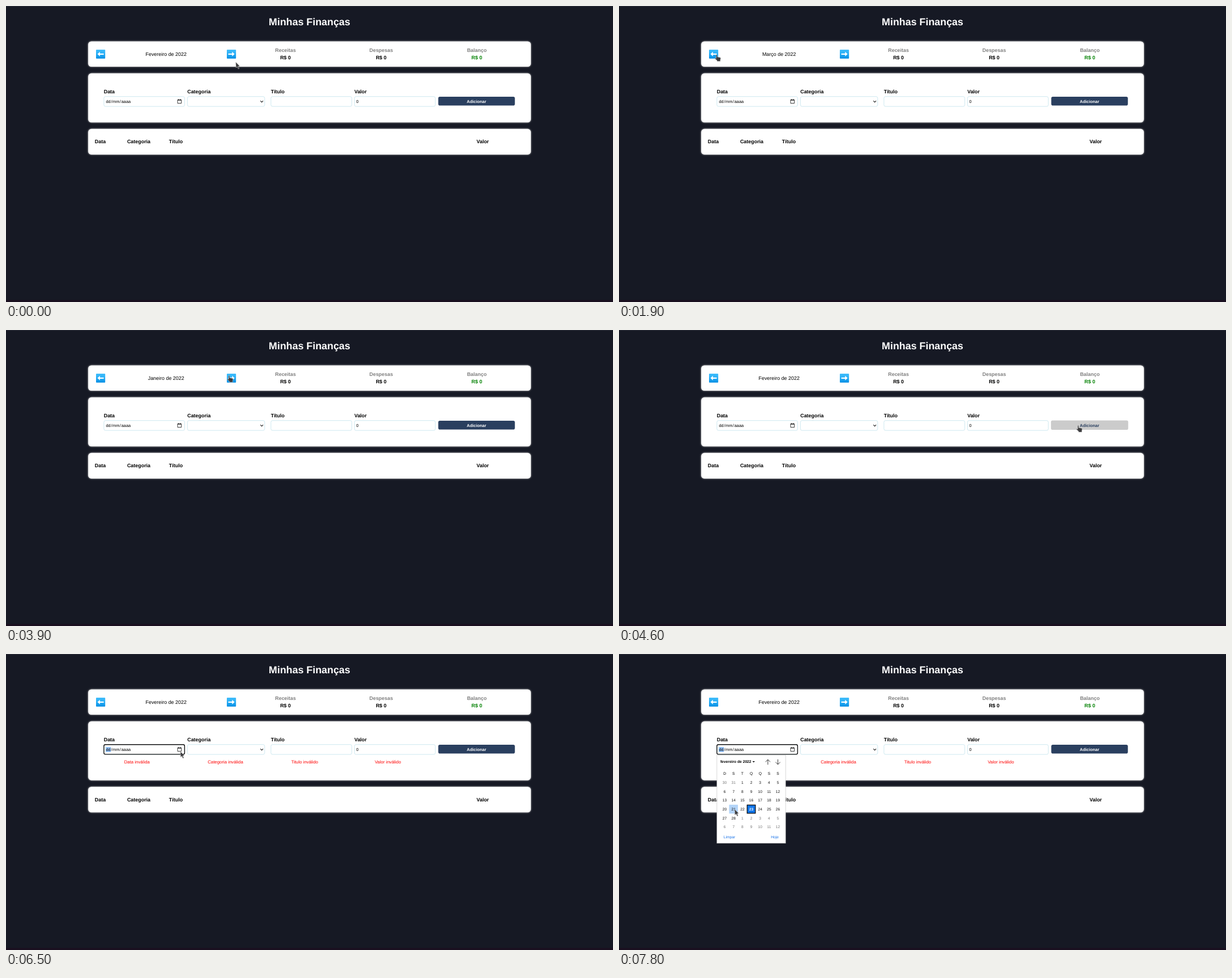
An HTML page for the animation above (8 s loop, 1072 by 522 pixels).

```html
<!DOCTYPE html>
<html lang="pt-BR">
<head>
<meta charset="utf-8">
<title>Minhas Finanças</title>
<style>
html, body { margin: 0; width: 100%; height: 100%; overflow: hidden; background: #161924; }
svg { display: block; width: 1072px; height: 522px; }
text { font: 8.93px "Liberation Sans", Arial, sans-serif; text-rendering: geometricPrecision; white-space: pre; }
.b { font-weight: 700; }
.mid { text-anchor: middle; }
.h1 { font-size: 17.87px; fill: #fff; }
.ctl { font-size: 7.444px; }
.err { font-size: 7.82px; fill: #f00; }
.cal { font-size: 6.7px; }
.card { fill: #fff; filter: drop-shadow(0 0 1.4px #ccc); }
.field { fill: #fff; stroke: #add8e6; stroke-width: .6; }
.line { fill: none; stroke: #222; stroke-width: .9; }
.cursor { fill: #3c3c3e; stroke: #d0d0d0; stroke-width: .5; stroke-linejoin: round; }
</style>
</head>
<body>
<svg id="stage" viewBox="0 0 1072 522"></svg>
<script>
const LOOP = 8000, COL = 147.5, CELL = 15.66, SHIFT = 17.35;
const INK = '#2a3f5f';

const text = (x, y, s, cls = '', fill = '#000') =>
  `<text x="${x}" y="${y}" class="${cls}" fill="${fill}">${s}</text>`;
const rect = (x, y, w, h, r, attrs) =>
  `<rect x="${x}" y="${y}" width="${w}" height="${h}" rx="${r}" ${attrs}/>`;
const card = (y, h, id = '') => rect(145.2, y, 781.7, h, 5.6, `class="card" id="${id}"`);
const path = (d, attrs) => `<path d="${d}" ${attrs}/>`;

const arrowKey = (x, flip) => `<g transform="translate(${x} 84.8) scale(${flip} 1)">` +
  rect(-8.1, -7.9, 16.2, 15.8, .9, 'fill="url(#sky)"') +
  path('M-5.6 0L-1.2-4V-1.1H5.5V1.1H-1.2V4Z', 'fill="#fff"') + '</g>';

const total = (x, name, color) =>
  text(x, 81, name, 'b mid', '#808080') + text(x, 93.9, 'R$ 0', 'b mid', color);

function form() {
  const labels = ['Data', 'Categoria', 'Título', 'Valor'];
  const widths = [142.6, 136.4, 142.8, 142.8];
  return labels.map((s, i) =>
    text(172.7 + COL * i, 154.4, s, 'b') +
    rect(172.9 + COL * i, 159.7, widths[i], 17.4, 2.8, 'class="field"')).join('') +
    `<g id="focus">` +
    rect(172.9, 159.8, 142.5, 17.1, 2.6, 'fill="none" stroke="#101010" stroke-width="1.4"') +
    rect(175.9, 164, 9.3, 8.9, 0, 'fill="#99c8ff"') + '</g>' +
    text(176.4, 171, 'dd', 'ctl') + text(185.4, 171, '/', 'ctl') +
    text(188, 171, 'mm', 'ctl') + text(201, 171, '/', 'ctl') + text(203.7, 171, 'aaaa', 'ctl') +
    path('M303.1 165.4H309.6V171.7H303.1ZM303.1 166.2H309.6M304.6 164V165.4M308.1 164V165.4', 'class="line"') +
    path('M449.3 167.2L451.7 169.6L454.1 167.2', 'class="line" style="stroke-width:1.1"') +
    text(618.4, 171, '0', 'ctl') +
    rect(763.4, 159.9, 135.3, 15.6, 2.8, `id="button" fill="${INK}"`) +
    `<text id="add" x="831" y="170.7" class="ctl b mid">Adicionar</text>`;
}

const errors = () => ['Data inválida', 'Categoria inválida', 'Titulo inválido', 'Valor inválido']
  .map((s, i) => text(208.7 + COL * i, 192.8, s, 'err')).join('');

const table = () => card(216.8, 45.2) +
  text(156.8, 242.2, 'Data', 'b') + text(213.9, 242.2, 'Categoria', 'b') +
  text(287.8, 242.2, 'Título', 'b') + text(831, 242.2, 'Valor', 'b');

const cellX = c => 186.6 + CELL * c, cellY = r => 226.6 + CELL * r;

function calendar() {
  let out = rect(172.9, 178.2, 121.3, 155.6, 0, 'fill="#fff" stroke="#bfbfbf" stroke-width=".6"') +
    text(178.9, 192.3, 'fevereiro de 2022', 'cal b') +
    path('M235.6 188.9H240L237.8 191.2Z', '') +
    path('M262.9 195.2V186.2M258.8 190.3L262.9 186.2L267 190.3', 'class="line"') +
    path('M280.6 185.8V194.8M276.5 190.7L280.6 194.8L284.7 190.7', 'class="line"') +
    rect(0, 0, 15.6, 15.6, 0, 'id="hover" fill="#b3d4f8"') +
    rect(cellX(3) - 7.3, cellY(3) - 7.3, 14.6, 14.6, 0, 'fill="#1074e7" stroke="#000" stroke-width="1.2"');
  [...'DSTQQSS'].forEach((s, c) => out += text(cellX(c), 213, s, 'cal mid'));
  for (let i = 0; i < 42; i++) {
    const n = i - 1, inside = n > 0 && n < 29;
    const day = n < 1 ? n + 31 : inside ? n : n - 28;
    const today = n === 23;
    out += text(cellX(i % 7), cellY(Math.floor(i / 7)) + 2.4, day, today ? 'cal b mid' : 'cal mid',
      today ? '#fff' : inside ? '#111' : '#757575');
  }
  return out + text(184.8, 324.7, 'Limpar', 'cal', '#1a73e8') + text(268.2, 324.7, 'Hoje', 'cal', '#1a73e8');
}

document.getElementById('stage').innerHTML =
  `<defs><linearGradient id="sky" x2="0" y2="1"><stop stop-color="#40bdfb"/>` +
  `<stop offset=".5" stop-color="#27adf5"/><stop offset="1" stop-color="#078ee4"/></linearGradient></defs>` +
  rect(0, 0, 1072, 522, 0, 'fill="#161924"') +
  rect(0, 0, 1072, .9, 0, 'fill="#2c2e38"') + rect(0, 518.4, 1072, 3.6, 0, 'fill="#1a1020"') +
  text(536, 33.8, 'Minhas Finanças', 'h1 b mid', '#fff') +
  card(62.4, 44.7) + arrowKey(167.1, 1) + arrowKey(398.1, -1) +
  `<text id="month" x="282.7" y="87.9" class="mid"></text>` +
  total(493.6, 'Receitas', '#000') + total(662.6, 'Despesas', '#000') + total(831.5, 'Balanço', '#008000') +
  card(118.8, 86.5, 'formCard') + form() +
  `<g id="errors">${errors()}</g><g id="table">${table()}</g><g id="calendar">${calendar()}</g>` +
  path('M0 0L.4 9.9L2.6 8L4.4 12L6 11.3L4.3 7.4L7 7Z', 'id="pointer" class="cursor"') +
  path('M-.9 .9Q0-.6 .9 .9V4.2L6 5.3Q7.2 5.7 7 7L6.4 9.8V12.1H.6V10.6L-2.9 7.5Q-3.5 6.2-2.2 6.2L-.9 7Z',
    'id="hand" class="cursor"');

// Each move: start time, number of 100 ms steps, end point, upward arc
const moves = [
  [100, 2, 401, 91], [900, 3, 190.4, 81.2], [1400, 2, 174, 84], [1800, 2, 172.5, 85.5],
  [3100, 7, 399, 77, 11.5], [3900, 1, 394, 80], [4400, 1, 402, 74], [4500, 2, 811, 168],
  [5500, 2, 351, 180, 21], [5900, 4, 308, 172], [6900, 8, 214, 272], [7700, 2, 204.3, 274]
];
const months = [[0, 'Fevereiro'], [700, 'Março'], [2400, 'Fevereiro'], [2900, 'Janeiro'], [4100, 'Fevereiro']];

function cursorAt(t) {
  let x = 405.8, y = 99;
  for (const [start, steps, ex, ey, arc = 0] of moves) {
    if (t < start) break;
    const u = Math.min(1, (Math.floor((t - start) / 100) + 1) / steps);
    x += (ex - x) * u;
    y += (ey - y) * u - arc * 4 * u * (1 - u);
  }
  return [x, y];
}

const el = id => document.getElementById(id);
const set = (id, attrs) => { for (const k in attrs) el(id).setAttribute(k, attrs[k]); };
const show = (id, on) => set(id, { visibility: on ? 'inherit' : 'hidden' });
const within = (x, y, l, t, r, b) => x >= l && x <= r && y >= t && y <= b;

function draw(t) {
  const [x, y] = cursorAt(t);
  const onKey = within(x, y, 159, 76.9, 175.2, 92.7) || within(x, y, 390, 76.9, 406.2, 92.7);
  const onButton = within(x, y, 763, 159.5, 899, 176);
  const hand = onKey || onButton;
  show('hand', hand);
  show('pointer', !hand);
  set(hand ? 'hand' : 'pointer', { transform: `translate(${x} ${y})` });

  el('month').textContent = months.filter(m => t >= m[0]).pop()[1] + ' de 2022';
  set('button', onButton
    ? { x: 762.9, y: 159.4, width: 136.4, height: 16.7, fill: '#cbcbcb' }
    : { x: 763.4, y: 159.9, width: 135.3, height: 15.6, fill: INK });
  set('add', { fill: onButton ? INK : '#fff' });

  const invalid = t >= 5200;
  const drop = invalid ? SHIFT : 0;
  show('errors', invalid);
  set('formCard', { height: 86.5 + drop });
  set('table', { transform: `translate(0 ${drop})` });

  show('focus', t >= 6500);
  show('calendar', t >= 6800);
  const c = Math.round((x - cellX(0)) / CELL), r = Math.round((y - cellY(0)) / CELL);
  show('hover', t >= 6800 && c >= 0 && c < 7 && r >= 0 && r < 6);
  if (t < 6800) show('hover', false);
  set('hover', { x: cellX(c) - 7.8, y: cellY(r) - 7.8 });
}

const begin = performance.now();
function tick() {
  draw((performance.now() - begin) % LOOP);
  requestAnimationFrame(tick);
}
tick();
</script>
</body>
</html>
```
